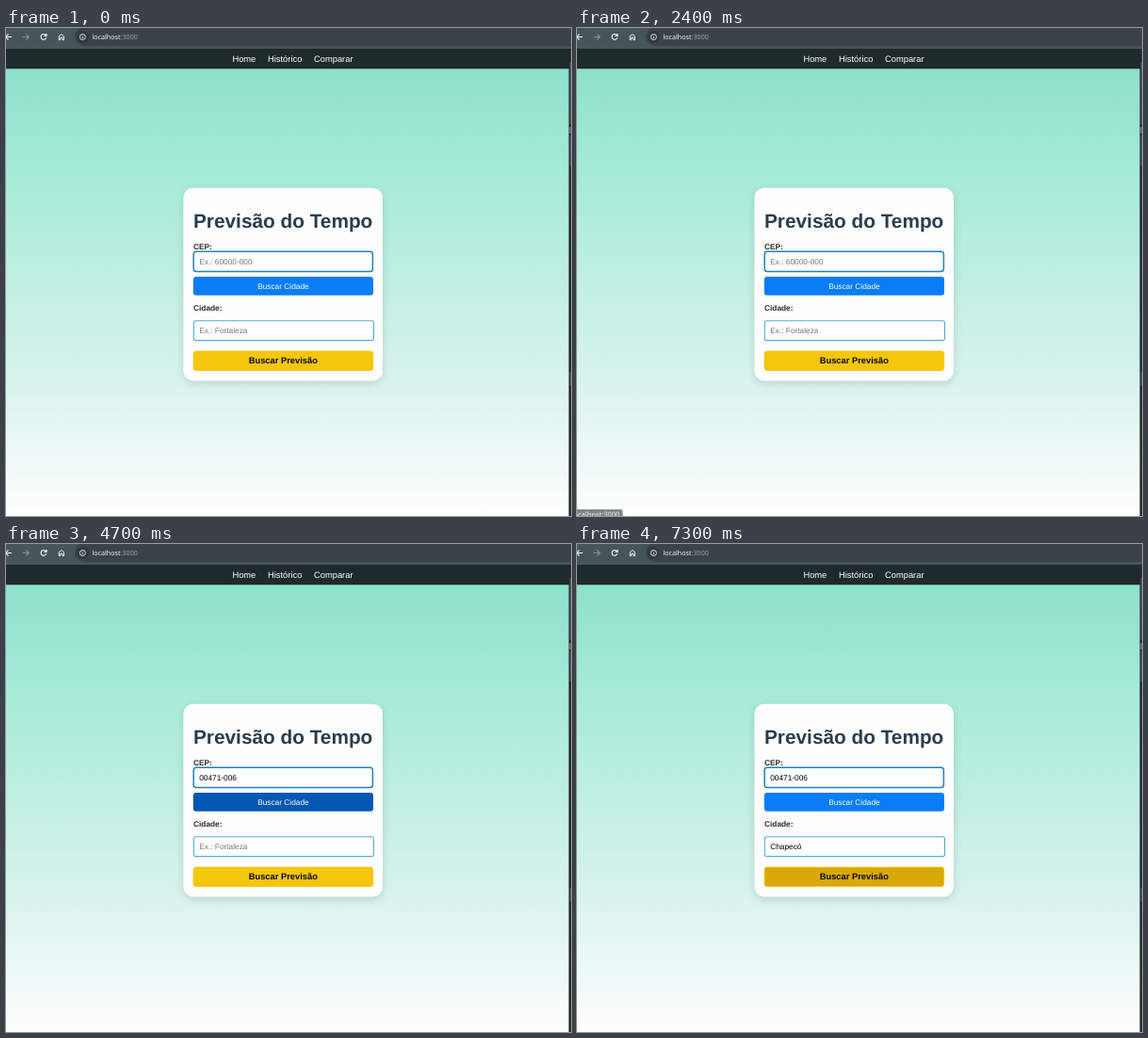
Animation of 600x518 px, one loop 8000 ms. Source, as an HTML page:

```html
<!DOCTYPE html>
<html lang="pt-BR">
<head>
<meta charset="utf-8">
<title>Previsão do Tempo</title>
<style>
  html, body { margin: 0; width: 100%; height: 100%; overflow: hidden; background: #fff; }
  svg { display: block; width: 600px; height: 518px; }
  text { font-family: "Liberation Sans", Arial, sans-serif; font-size: 8.32px; text-rendering: geometricPrecision; }
  .ui { font-family: "Noto Sans", sans-serif; font-size: 7.15px; }
  .nav { font-size: 9.36px; fill: #fff; }
  .bold { font-weight: bold; }
  .label { font-weight: bold; fill: #2b2b2b; }
  .hint { fill: #757575; }
  .mid { text-anchor: middle; }
  .icon { fill: none; stroke: #eef2f2; stroke-width: 1.2; }
  .card { filter: drop-shadow(0 3px 5px rgba(0, 0, 0, .13)); }
</style>
</head>
<body>
<svg viewBox="0 0 600 518">
  <defs>
    <linearGradient id="sky" x1="0" y1="0" x2="0" y2="1">
      <stop offset="0" stop-color="#8de1ca"/>
      <stop offset=".26" stop-color="#a8ebd9"/>
      <stop offset=".7" stop-color="#d9f3ee"/>
      <stop offset="1" stop-color="#fefefe"/>
    </linearGradient>
  </defs>

  <!-- page -->
  <rect y="43" width="598" height="475" fill="url(#sky)"/>
  <rect y="22" width="598" height="21.3" fill="#1e2a2b"/>
  <rect id="homeHover" x="234" y="23" width="38" height="19" rx="2" fill="#465351"/>
  <g class="nav">
    <text class="nav" x="240.4" y="35.6">Home</text>
    <text class="nav" x="278" y="35.6">Histórico</text>
    <text class="nav" x="327" y="35.6">Comparar</text>
  </g>

  <!-- window edge -->
  <rect x="597.6" y="22" width="2.4" height="496" fill="#24292c"/>
  <path d="M599.2 36V102M599.2 114V146M599.2 365V379" stroke="#566064" stroke-width="1"/>
  <path d="M599 105V112" stroke="#9aa5a9" stroke-width="1"/>

  <!-- browser bar -->
  <rect width="600" height="22" fill="#46555a"/>
  <rect x="73" y="-1" width="540" height="20" rx="10" fill="#3b4348"/>
  <circle cx="81.4" cy="9.5" r="6.6" fill="#303a3f"/>
  <path class="icon" d="M6 9.5H-1M2.5 6.5L-.5 9.5L2.5 12.5"/>
  <path class="icon" d="M17.5 9.5H24M21.3 6.5L24.3 9.5L21.3 12.5" style="stroke:#829094"/>
  <path class="icon" d="M42.3 7.6A2.9 2.9 0 1 0 42.8 10.2M43 6V8.4H40.5"/>
  <path class="icon" d="M56.2 12.6V8.7L58.8 6.6L61.4 8.7V12.6H59.9V10.2H57.7V12.6Z" style="stroke-width:1"/>
  <circle class="icon" cx="81.4" cy="9.5" r="3" style="stroke-width:.9"/>
  <path class="icon" d="M81.4 9.2V11.2M81.4 7.7V8.4" style="stroke-width:.9"/>
  <text class="ui" x="91.4" y="12" fill="#f2f4f4">localhost<tspan fill="#9ba4a7">:3000</tspan></text>

  <!-- form -->
  <rect class="card" x="188.4" y="169.8" width="211.6" height="204.6" rx="10.4" fill="#fdfdfd"/>
  <text class="bold" x="199" y="212.3" fill="#2a3d4f" style="font-size:20.8px">Previsão do Tempo</text>

  <text class="label" x="199" y="235">CEP:</text>
  <rect id="cepBox" x="199.2" y="237.3" width="190.2" height="21.2" rx="2.8" fill="#fff" stroke-width="1.5"/>
  <text id="cep" x="205.2" y="250.6"></text>
  <rect id="caret" y="243.5" width=".8" height="9.5" fill="#000"/>

  <rect id="cityBtn" x="198.8" y="264" width="191.2" height="19.8" rx="3"/>
  <text class="mid" x="294.4" y="276.6" fill="#fff">Buscar Cidade</text>

  <text class="label" x="199" y="300.3">Cidade:</text>
  <rect x="199.3" y="310.7" width="191.2" height="20.9" rx="2.4" fill="#fff" stroke="#55abd6" stroke-width="1.1"/>
  <text id="city" x="205.2" y="324"></text>

  <rect id="forecastBtn" x="199.1" y="343.1" width="190.6" height="20.4" rx="2.8" stroke="#f2c60e" stroke-width=".9"/>
  <text class="bold mid" x="294.3" y="356.2" fill="#0b0b0b" style="font-size:9.36px">Buscar Previsão</text>

  <!-- link preview -->
  <g id="status">
    <path d="M0 511H46.5Q48.5 511 48.5 513V518H0Z" fill="#3f494b"/>
    <text class="ui" x="45.4" y="518.6" text-anchor="end" fill="#e3e8e8" style="font-size:7.5px">localhost:3000</text>
  </g>
</svg>

<script>
const LOOP = 8000;
const el = id => document.getElementById(id);
const within = (t, from, to) => t >= from && t < to;
const ramp = (t, from, to) => Math.min(1, Math.max(0, (t - from) / (to - from)));

// Rises between a and b, falls back between c and d.
const pulse = (t, a, b, c, d) => ramp(t, a, b) - ramp(t, c, d);

const mix = (from, to, k) =>
  `rgb(${from.map((v, i) => Math.round(v + (to[i] - v) * k))})`;

function setField(id, value, hint) {
  const node = el(id), text = value || hint;
  if (node.textContent !== text) node.textContent = text;
  node.setAttribute("class", value ? "" : "hint");
}

function draw(t) {
  el("homeHover").style.opacity = pulse(t, 1650, 1950, 2100, 2400);
  el("status").style.opacity = pulse(t, 1850, 1950, 2350, 2500);

  const pasted = t >= 3600;
  setField("cep", pasted && "00471-006", "Ex.: 60000-000");
  setField("city", t >= 5400 && "Chapecó", "Ex.: Fortaleza");

  el("cepBox").style.stroke = within(t, 2600, 4200) ? "#0a0a0a" : "#277fb3";
  el("caret").style.opacity = within(t, 2600, 3200) || within(t, 3600, 4200) ? 1 : 0;
  el("caret").setAttribute("x", pasted ? 245.4 : 205);

  el("cityBtn").style.fill =
    mix([8, 125, 246], [3, 87, 178], pulse(t, 4150, 4450, 6150, 6450));
  el("forecastBtn").style.fill =
    mix([244, 198, 12], [216, 169, 8], ramp(t, 6650, 6950));
}

const start = performance.now();
function tick() {
  draw((performance.now() - start) % LOOP);
  requestAnimationFrame(tick);
}
tick();
</script>
</body>
</html>
```
